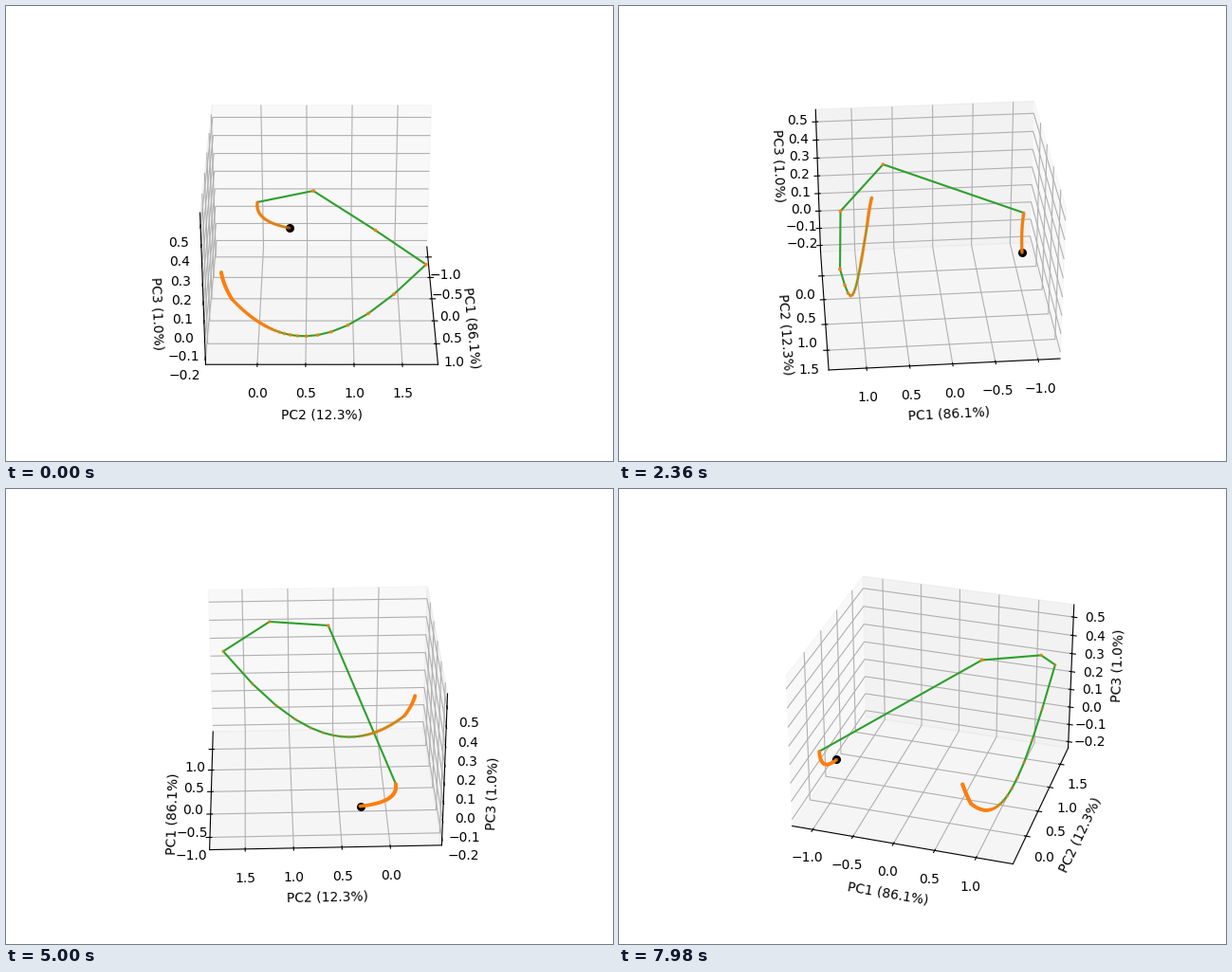
Write a matplotlib script that moves like this. It is 640 by 480 pixels and loops after 8 s.

```python
import numpy as np
import matplotlib.pyplot as plt
from matplotlib.animation import FuncAnimation

TICK = 20      # ms per animation frame
LOOP = 8000    # ms per loop


def bezier(a, b, c, count):
    """Quadratic curve from a to c, pulled towards b."""
    t = np.linspace(0, 1, count)[:, None]
    a, b, c = map(np.array, (a, b, c))
    return (1 - t)**2 * a + 2 * t * (1 - t) * b + t**2 * c


def valley(y):
    """PC1 and PC3 as cubics of PC2 around the lowest point."""
    u = y - 0.4
    x = 1.030 + 0.21 * u - 0.0656 * u**2 + 0.033 * u**3
    z = -0.184 + 0.316 * u**2 - 0.046 * u**3
    return np.column_stack([x, y, z])


def shrinking(start, end, step, ratio, least):
    """Values from start down to end in steps that shrink to a least size."""
    values = []
    while start > end:
        values.append(start)
        start -= step
        step = max(step * ratio, least)
    return np.array(values)


def build_path():
    head = bezier((-1.026, 0.304, -0.073), (-1.067, -0.090, -0.045),
                  (-1.0915, -0.054, 0.0606), 50)
    jumps = [(0.691, 0.580, 0.514), (1.2275, 1.204, 0.430)]
    slide = valley(shrinking(1.721, -0.28, 0.316, 0.817, 0.014))
    hook = bezier(slide[-1], (0.816, -0.3625, 0.0455), (0.779, -0.379, 0.102), 40)
    return np.vstack([head, jumps, slide, hook])


path = build_path()
fig = plt.figure(figsize=(6.4, 4.8), dpi=100)
ax = fig.add_subplot(projection="3d")
ax.plot(*path.T, color="tab:green")
ax.scatter(*path.T, s=3, color="tab:orange")
ax.scatter(*path[:1].T, s=30, color="black")

ax.set(xlim=(-1.258, 1.438), ylim=(-0.534, 1.868), zlim=(-0.2364, 0.5666),
       xticks=np.arange(-2, 3) / 2, yticks=np.arange(4) / 2,
       zticks=np.arange(-2, 6) / 10,
       xlabel="PC1 (86.1%)", ylabel="PC2 (12.3%)", zlabel="PC3 (1.0%)")


def view_number(ms):
    """Ten views per 920 ms; the fifth one lasts only 20 ms."""
    cycle, rest = divmod(ms, 920)
    if rest >= 420:
        rest += 80
    return 10 * cycle + rest // 100


def update(i):
    # Whole degrees, 33 per ten views; the tiny offset fixes the axis sides at 0.
    degrees = 33 * view_number(i * TICK) // 10
    ax.view_init(elev=30, azim=degrees + 0.01)
    return []


def reset():
    return update(0)


anim = FuncAnimation(fig, update, frames=LOOP // TICK, init_func=reset,
                     interval=TICK, repeat=True, repeat_delay=0, blit=False)
plt.show()
```
